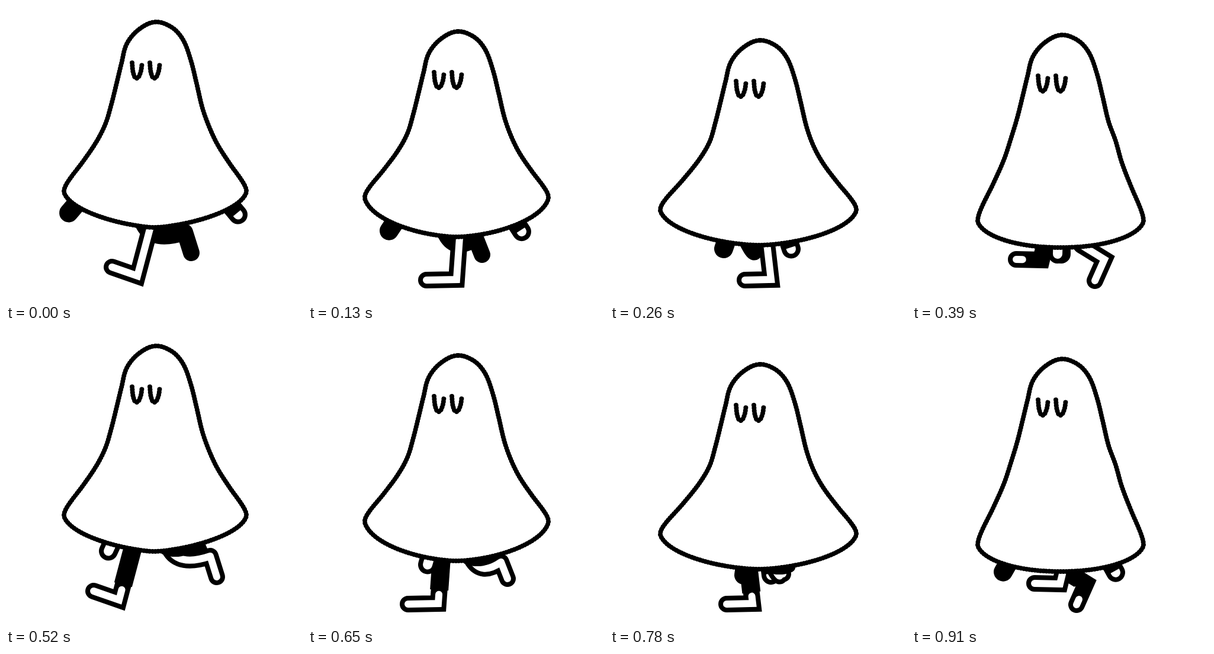
Write an HTML page with a canvas that moves like this. It is 500 by 500 pixels and loops after 1.04 s.

```html
<!DOCTYPE html>
<html lang="en">
<head>
<meta charset="utf-8">
<title>Walking ghost</title>
<style>
  html, body { margin: 0; width: 100%; height: 100%; overflow: hidden; background: #fff; }
  canvas { display: block; width: 500px; height: 500px; }
</style>
</head>
<body>
<canvas id="stage" width="500" height="500"></canvas>
<script>
const ctx = document.getElementById('stage').getContext('2d');
const STEP = 130, PHASES = 8, LINE = 8, CENTER = 251;
const BLACK = '#000', WHITE = '#fff';

// One bounce per footstep, so the cloak repeats twice per walk cycle.
const bounce = [
  { top: 27, left: 98, right: 406, corner: 312, hem: 374, round: 1.5 },
  { top: 43, left: 96, right: 406, corner: 322, hem: 390, round: 1.7 },
  { top: 58, left: 85, right: 416, corner: 343, hem: 404, round: 1.7 },
  { top: 49, left: 111, right: 391, corner: 362, hem: 408, round: 2.1 }
];

// Both legs walk through these keys, half a cycle apart.
const gait = [
  { heel: [222, 456], toe: [179, 441] },
  { heel: [251, 462], toe: [200, 463] },
  { heel: [272, 462], toe: [228, 463] },
  { heel: [325, 428], toe: [309, 464] },
  { heel: [345, 382], toe: [356, 417] },
  { heel: [326, 392], toe: [337, 420] },
  { heel: [285, 402], toe: [292, 412] },
  { heel: [250, 429], toe: [207, 428] }
];
const handX = [392, 361, 306, 246, 173, 202, 272, 344];

const mix = (a, b, t) => a + (b - a) * t;
const mixPoint = (p, q, t) => [mix(p[0], q[0], t), mix(p[1], q[1], t)];

// Smooth curve through points; handles scale with each segment.
function trace(points, closed) {
  const n = points.length;
  const at = i => closed ? points[(i + n) % n] : points[Math.max(0, Math.min(n - 1, i))];
  const tangent = i => {
    const [ax, ay] = at(i - 1), [bx, by] = at(i + 1);
    const len = Math.hypot(bx - ax, by - ay) || 1;
    return [(bx - ax) / len, (by - ay) / len];
  };
  ctx.beginPath();
  ctx.moveTo(...points[0]);
  for (let i = 0; i < (closed ? n : n - 1); i++) {
    const [px, py] = at(i), [qx, qy] = at(i + 1);
    const [ux, uy] = tangent(i), [vx, vy] = tangent(i + 1);
    const h = Math.hypot(qx - px, qy - py) / 3;
    ctx.bezierCurveTo(px + ux * h, py + uy * h, qx - vx * h, qy - vy * h, qx, qy);
  }
}

function stroke(color, width, join = 'round', cap = 'round') {
  ctx.strokeStyle = color;
  ctx.lineWidth = width;
  ctx.lineJoin = join;
  ctx.lineCap = cap;
  ctx.stroke();
}

// Overlapping round dabs give the bumpy marker edge.
function ink() {
  ctx.setLineDash([0.01, 4.8]);
  stroke(BLACK, LINE);
  ctx.setLineDash([]);
}

function line(points, color, width, join, cap) {
  ctx.beginPath();
  points.forEach(p => ctx.lineTo(...p));
  stroke(color, width, join, cap);
}

function hemAt(x, body) {
  const half = x < CENTER ? CENTER - body.left : body.right - CENTER;
  const u = Math.min(1, Math.abs(x - CENTER) / half);
  return mix(body.corner, body.hem, (1 - u ** body.round) ** 0.55);
}

function drawCloak(body) {
  const side = (profile, cornerX) => {
    const dome = profile.map(([x, y]) => [x, body.top + y]);
    const waist = dome[dome.length - 1];
    const skirt = [[0.22, 0.27], [0.55, 0.57], [0.9, 0.86]].map(([tx, ty]) =>
      [mix(waist[0], cornerX, tx), mix(waist[1], body.corner, ty)]);
    return [...dome, ...skirt];
  };
  const left = side([[224, 13], [204, 37], [195, 70], [187, 103], [178, 139], [168, 172]], body.left);
  const right = side([[280, 9], [299, 30], [312, 64], [322, 104], [332, 146], [344, 179]], body.right);
  const hem = [];
  for (let i = 0; i <= 14; i++) {
    const c = -Math.cos(i / 14 * Math.PI);
    const x = c < 0 ? mix(CENTER, body.left, -c) : mix(CENTER, body.right, c);
    hem.push([x, hemAt(x, body)]);
  }
  trace([[252, body.top], ...left, ...hem, ...right.reverse()], true);
  ctx.fillStyle = WHITE;
  ctx.fill();
  ink();
}

function drawEyes(top) {
  for (const x of [213, 243]) {
    trace([[0, 69], [2, 86], [7.5, 95], [14, 86], [17, 69]].map(([a, b]) => [x + a, top + b]));
    ink();
  }
}

function drawHand(x, body, near) {
  const shoulder = mix(x, CENTER, 0.1);
  const y = hemAt(shoulder, body);
  const arm = [[shoulder, y - 6], [x, y + 11]];
  line(arm, BLACK, 32);
  if (!near) return;
  line(arm, WHITE, 32 - 2 * LINE);
  if (x > CENTER) line([arm[0], mixPoint(...arm, 0.85)], BLACK, 30, 'round', 'butt');
}

function drawLeg(phase, body, near) {
  const key = gait[phase];
  const trailing = key.toe[0] > key.heel[0];
  const shift = near ? 0 : trailing ? -43 : -31;
  const move = ([x, y]) => [x + shift, y];
  const hip = move([trailing ? 276 : key.heel[0] * 0.4 + 156, body.hem - 4]);
  const heel = move(key.heel), toe = move(key.toe);
  const knee = trailing ? [hip[0] + 16, hip[1] + 30] : mixPoint(hip, heel, 0.5);
  const join = trailing ? 'round' : 'miter';
  const limb = (color, width) => {
    ctx.beginPath();
    ctx.moveTo(...hip);
    ctx.quadraticCurveTo(...knee, ...heel);
    ctx.lineTo(...toe);
    stroke(color, width, join);
  };

  limb(BLACK, 28);
  if (near) {
    limb(WHITE, 28 - 2 * LINE);
    if (trailing) {
      ctx.beginPath();
      ctx.ellipse(hip[0] + 10, body.hem - 2, 27, 11, 0, 0, 2 * Math.PI);
      ctx.fillStyle = BLACK;
      ctx.fill();
    }
    return;
  }
  line([hip, mixPoint(hip, heel, 0.7)], BLACK, 31, 'round', 'butt');
  if (trailing) return;
  const grounded = heel[1] > 450;
  const sock = grounded ? [mixPoint(heel, hip, 0.2), heel, toe] : [mixPoint(heel, toe, 0.75), toe];
  line(sock, WHITE, 28 - 2 * LINE, join);
}

function drawPose(phase) {
  const body = bounce[phase % bounce.length];
  ctx.fillStyle = WHITE;
  ctx.fillRect(0, 0, 500, 500);
  drawHand(2 * CENTER - 4 - handX[phase], body, false);
  drawLeg((phase + PHASES / 2) % PHASES, body, false);
  drawHand(handX[phase], body, true);
  drawLeg(phase, body, true);
  drawCloak(body);
  drawEyes(body.top);
}

const start = performance.now();

function render() {
  drawPose(Math.floor((performance.now() - start) / STEP) % PHASES);
  requestAnimationFrame(render);
}
render();
</script>
</body>
</html>
```
